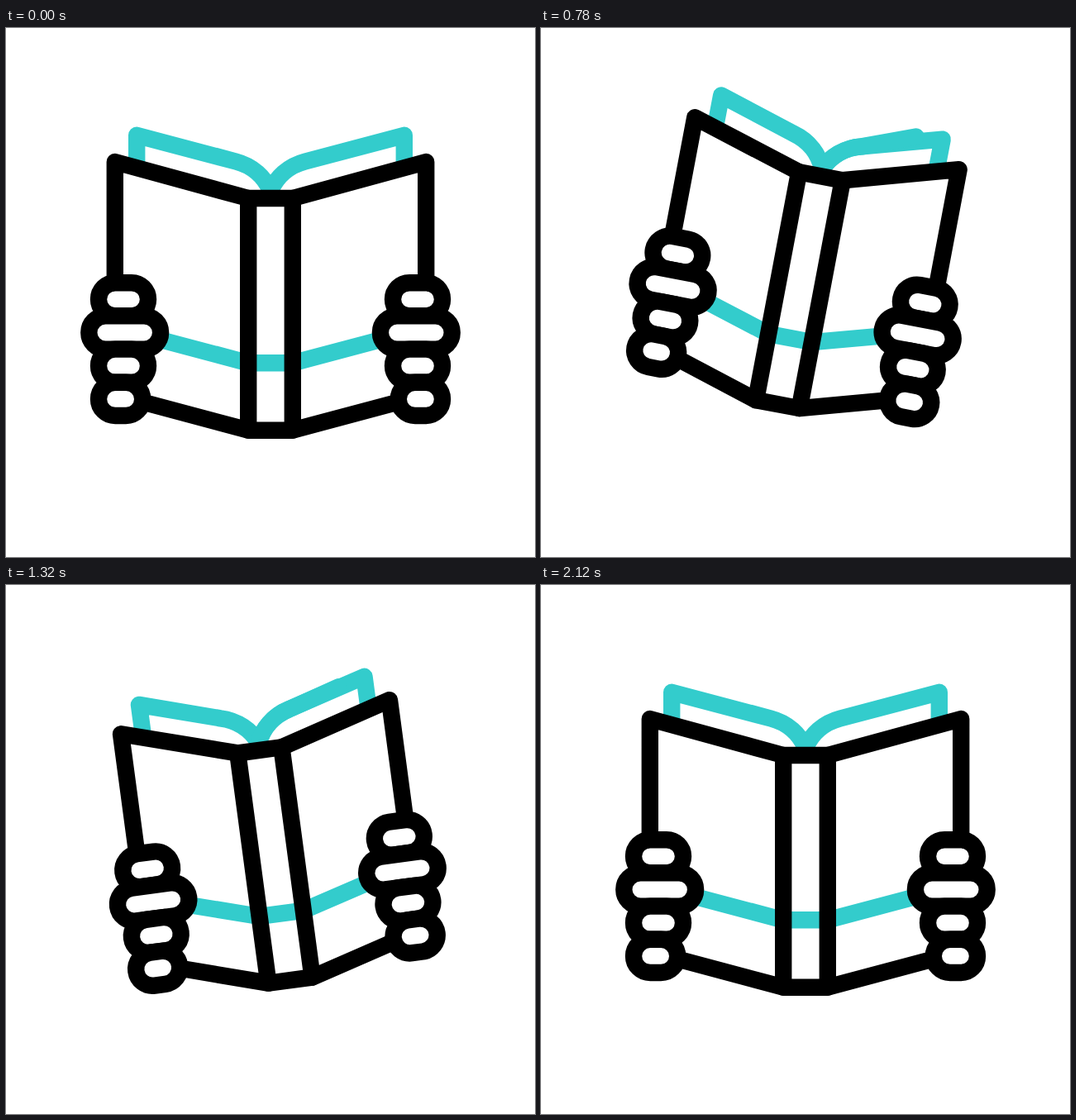
Recreate the animation shown at these times as an HTML page. Size 640 by 640 pixels, loop 2400 ms.

```html
<!DOCTYPE html>
<html lang="en">
<head>
<meta charset="utf-8">
<title>Reading a book</title>
<style>
  html, body { margin: 0; width: 100%; height: 100%; overflow: hidden; background: #fff; }
  svg { display: block; width: 100vw; height: 100vh; }
  path, rect { stroke-width: 20.4; stroke-linecap: round; stroke-linejoin: round; fill: none; }
  .ink { stroke: #000; }
  .teal { stroke: #33cccc; }
  .paper { fill: #fff; stroke: none; }
  rect.ink { fill: #fff; }
</style>
</head>
<body>
<svg viewBox="0 0 640 640"><g id="book"></g></svg>
<script>
const LOOP = 2400, STEP = 20;
const PIVOT = { x: 320, y: 305.5 };
const SPINE = { left: 293.2, right: 346.8, top: 206, bottom: 486.7, band: 405.3 };

// [time, value] pairs, eased in and out between neighbours
const TILT = [[0, 0], [410, -16.5], [875, 14], [1320, -7.6], [1700, 3.5], [2120, 0]];
const DROP = [[0, 0], [312, 60], [752, -31], [1030, 59], [1400, -16], [1825, 16], [2120, 0]];
const CLOSE = [[248, 0], [798, 1], [1240, 1], [1900, 0]];
const LIFT = [[600, 0], [780, 6.2], [1000, 1.2], [1320, 1], [1500, 0]];

const smooth = u => u * u * (3 - 2 * u);

function valueAt(keys, t) {
  if (t <= keys[0][0]) return keys[0][1];
  for (let i = 1; i < keys.length; i++) {
    const [t0, a] = keys[i - 1], [t1, b] = keys[i];
    if (t < t1) return a + (b - a) * smooth((t - t0) / (t1 - t0));
  }
  return keys[keys.length - 1][1];
}

function add(parent, tag, attrs) {
  const node = document.createElementNS("http://www.w3.org/2000/svg", tag);
  for (const name in attrs) node.setAttribute(name, attrs[name]);
  return parent.appendChild(node);
}

const book = document.getElementById("book");
const layer = () => [
  add(book, "g", {}),
  add(book, "g", { transform: "matrix(-1 0 0 1 640 0)" })
];
const pageLayers = layer();
const coverLayers = layer();

const spine = add(book, "g", {});
add(spine, "path", { class: "teal", d: `M${SPINE.left} ${SPINE.band}H${SPINE.right}` });
add(spine, "path", {
  class: "ink",
  d: `M${SPINE.left} ${SPINE.top}H${SPINE.right}V${SPINE.bottom}H${SPINE.left}Z`
});

const handLayers = layer();

// One half of the book, described as the left one; the right half is mirrored.
function makeSide(i) {
  const page = add(pageLayers[i], "path", { class: "teal" });
  const flap = add(pageLayers[i], "path", { class: "teal" });
  const paper = add(coverLayers[i], "path", { class: "paper" });
  const band = add(coverLayers[i], "path", { class: "teal" });
  const cover = add(coverLayers[i], "path", { class: "ink" });
  const hand = add(handLayers[i], "g", {});
  [[112, 60], [100.3, 86.8], [112, 60], [112, 53.2]].forEach(([x, width], row) =>
    add(hand, "rect", {
      class: "ink", x, width, y: 308.2 + row * 40.2, height: 40.2, rx: 20.1
    }));
  const edge = add(handLayers[i], "path", { class: "ink" });

  return (dx, dy, lift) => {
    const x = 131.8 + dx, y = 162 + dy;
    const { left, top, bottom } = SPINE;
    const px = x + 26.4, py = y - 32.2;
    const curve = "278 161.5C299 167 313 181 320 197";
    page.setAttribute("d", `M${px} ${y + 4}V${py}L${curve}`);

    const fx = 278 + (px - 278) * 0.66, fy = 161.5 + (py - 161.5) * 0.66 - lift;
    flap.setAttribute("d", lift ? `M${fx} ${fy}L${curve}` : "");

    paper.setAttribute("d", `M${x} ${y}L${left} ${top}V${bottom}L${x} ${y + 281}Z`);
    band.setAttribute("d", `M${x + 30} ${y + 208.5}L${left} ${SPINE.band}`);
    cover.setAttribute("d", `M${x} ${y + 146}V${y}L${left} ${top}`);
    hand.setAttribute("transform", `translate(${dx} ${dy})`);
    edge.setAttribute("d", `M${x + 33.5} ${y + 290.5}L${left} ${bottom}`);
  };
}

const leftSide = makeSide(0);
const rightSide = makeSide(1);

function draw(t) {
  const close = valueAt(CLOSE, t);
  leftSide(25.5 * close, 2.5 * close, 0);
  rightSide(25.5 * close, 5 * close * close, valueAt(LIFT, t));
  book.setAttribute("transform",
    `translate(0 ${valueAt(DROP, t)}) rotate(${valueAt(TILT, t)} ${PIVOT.x} ${PIVOT.y})`);
}

const start = performance.now();
function tick() {
  const t = (performance.now() - start) % LOOP;
  draw(Math.floor(t / STEP) * STEP);
  requestAnimationFrame(tick);
}
draw(0);
requestAnimationFrame(tick);
</script>
</body>
</html>
```
